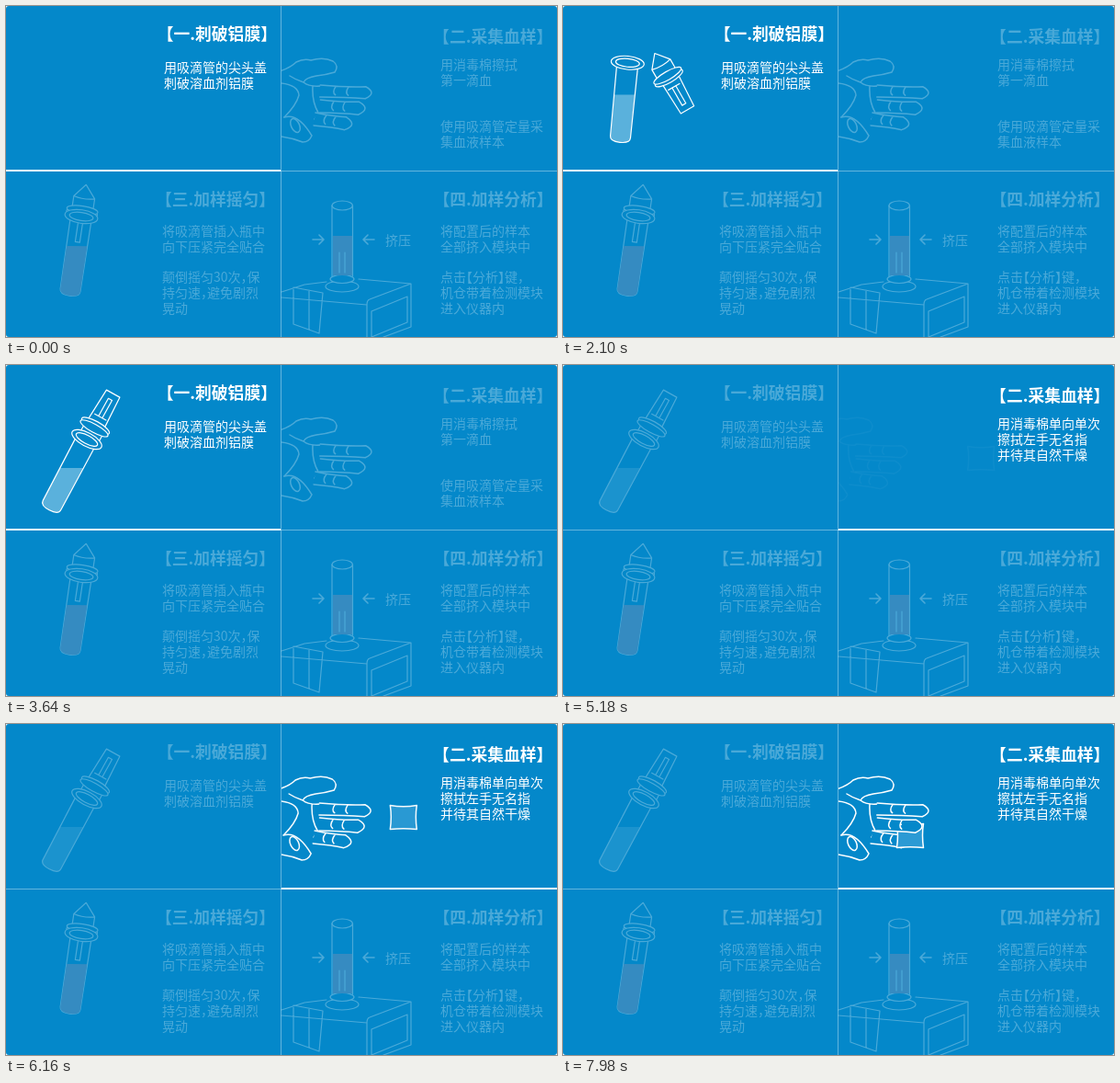
An HTML page that plays this animation: 600 by 360 pixels, repeating every 8000 ms.

```html
<!DOCTYPE html>
<html lang="zh-CN">
<head>
<meta charset="utf-8">
<style>
html, body { margin: 0; height: 100%; overflow: hidden; background: #fff }
svg { display: block; width: 600px; height: 360px }
text { font: 14px "Noto Sans CJK SC", "Noto Sans CJK", sans-serif; font-feature-settings: "halt"; fill: #fff; stroke: none }
.title { font-size: 17.8px; font-weight: 700 }
.art { fill: none; stroke: #fff; stroke-width: 1.2; stroke-linejoin: round; stroke-linecap: round }
.hand { stroke-width: 1.5 }
.solid { fill: #0488ca }
.water { fill: #fff; fill-opacity: .34; stroke: none }
.blood { fill: #b894ac; stroke: none }
.dim { opacity: .28 }
</style>
</head>
<body>
<svg viewBox="0 0 600 360">
  <defs>
    <clipPath id="right"><rect x="300" width="300" height="179"/></clipPath>
    <g id="glass" class="solid">
      <path d="M-11.500 4L-11 81Q-11 87 0 87Q11 87 11 81L11.500 4"/>
      <ellipse rx="18" ry="7.300"/>
      <ellipse rx="13" ry="4.500"/>
    </g>
    <g id="dropper">
      <path d="M-11.500-4V-15L0-29L11.500-15V-4M-11.500-15Q0-12 11.500-15M-9.500 6L-8 42H8.500L10.500 6M-7 13H7M-2.300 13V35H2.300V13"/>
      <ellipse class="solid" cy="2" rx="17" ry="5"/>
      <ellipse class="solid" cy="-1" rx="17" ry="4.500"/>
    </g>
  </defs>
  <rect class="solid" width="600" height="360" rx="3"/>
  <path d="M299.500 0V360M0 179.500H600" stroke="#fff" stroke-opacity=".38"/>
  <path id="bar" d="M0 179H299" stroke="#fff" stroke-width="2"/>

  <g id="p1">
    <g class="art">
      <use id="cap" href="#dropper"/>
      <g id="tube"><use href="#glass"/><path id="water" class="water"/></g>
    </g>
  </g>

  <g id="p2">
    <g id="before"></g><g id="after"></g>
    <g class="art hand" clip-path="url(#right)">
      <g class="slide">
        <path d="M290 73Q308 69 316 61Q324 57 332 59Q346 55 356 60Q363 65 358 72Q348 75 338 76Q326 78 324 83Q330 88 342 87M324 83Q315 80 309 76M300 84Q318 86 319 97Q316 108 303 121M334 87Q333 104 340 116L336 123"/>
        <path class="solid" d="M303 121Q318 116 333 141Q330 148 323 148Q308 142 290 141"/>
        <ellipse cx="315" cy="130" rx="4.500" ry="8" transform="rotate(-25 315 130)"/>
        <g id="low"></g>
      </g>
      <path id="pad" d="M.5.5Q15 3 29.500.5Q27.500 13 29.500 26.500Q15 25 .5 26.500Q2.500 13 .5.5Z" fill="#2b9ad4"/>
      <g class="slide" id="high"></g>
    </g>
  </g>

  <g id="p3" class="dim">
    <g class="art">
      <use href="#dropper" transform="translate(83 223) rotate(8.500)"/>
      <g transform="translate(82 229) rotate(8.500)">
        <use href="#glass"/>
        <path class="blood" d="M-11 34L11 31V81Q11 87 0 87Q-11 87-11 81Z"/>
        <path d="M-2.500 8V28H2.500V8"/>
      </g>
    </g>
  </g>

  <g id="p4" class="dim">
    <g class="art">
      <path d="M300 311L325 303L349 300M384 297L441 302L396 319Q393 320 393 325V360M441 302V349L411 360M300 317L393 325M313 306V346L341 356L345 312L313 306M330 309V352M398 332L437 316V344L398 360Z"/>
      <ellipse class="solid" cx="366" cy="305" rx="18" ry="6"/>
      <ellipse class="solid" cx="366" cy="297" rx="13" ry="4.500"/>
      <path class="blood" d="M356 250H377V293H356Z"/>
      <path d="M355 217V294M377.500 217V294M363 268V290M369 268V290"/>
      <ellipse cx="366.200" cy="217" rx="11.200" ry="5"/>
      <path d="M334 254H346M341 249L346 254L341 259M401 254H389M394 249L389 254L394 259" stroke-width="1.600"/>
    </g>
  </g>
</svg>
<script>
const $ = id => document.getElementById(id);
const set = (el, attrs) => { for (const k in attrs) el.setAttribute(k, attrs[k]); };
const add = (id, html) => $(id).insertAdjacentHTML("beforeend", html);

function write(id, x, y, text, cls = "") {
  text.split("/").forEach((s, i) =>
    add(id, `<text class="${cls}" x="${x}" y="${Math.round(y + i * 16.8)}">${s}</text>`));
}
write("p1", 173.6, 37, "【一.刺破铝膜】", "title");
write("p1", 172, 72, "用吸滴管的尖头盖/刺破溶血剂铝膜");
write("p2", 474, 40, "【二.采集血样】", "title");
write("before", 473, 69, "用消毒棉擦拭/第一滴血///使用吸滴管定量采/集血液样本");
write("after", 473, 69, "用消毒棉单向单次/擦拭左手无名指/并待其自然干燥");
write("p3", 171.8, 217, "【三.加样摇匀】", "title");
write("p3", 170, 250, "将吸滴管插入瓶中/向下压紧完全贴合//颠倒摇匀30次，保/持匀速，避免剧烈/晃动");
write("p4", 474.3, 217, "【四.加样分析】", "title");
write("p4", 473, 250, "将配置后的样本/全部挤入模块中//点击【分析】键，/机仓带着检测模块/进入仪器内");
write("p4", 413, 260, "挤压");

// a finger with two joint creases, open at its base
function finger(id, x, y, length, width, angle) {
  const r = width / 2, end = length - r, mid = length / 2;
  const crease = at => `M${at} ${1 - r}q-4 ${r} 0 ${width * .7}`;
  add(id, `<path class="solid" transform="translate(${x} ${y}) rotate(${angle})"
    d="M0 ${-r}Q${mid} ${1.5 - r} ${end} ${-r}q${width} ${r} 0 ${width}Q${mid} ${r - 1} 0 ${r}${crease(length * .3)}${crease(length * .55)}"/>`);
}
finger("low", 336, 123, 41, 14, 8);
finger("high", 342, 109, 49, 14, 3);
finger("high", 342, 92.5, 56, 13, 2);

const mix = (a, b, p) => a + (b - a) * p;
function ease(t, from, to) {
  const p = Math.min(1, Math.max(0, (t - from) / (to - from)));
  return p * p * (3 - 2 * p);
}

function draw(now) {
  const t = Math.floor(now % 8000 / 140) * 140;
  const second = t >= 5180;
  const enter = ease(t, 0, 980), flip = ease(t, 1820, 2800), plug = ease(t, 3080, 3640);
  const slide = second ? ease(t, 5040, 6300) : 1, wipe = ease(t, 7000, 7980);

  const angle = 28 * flip;
  set($("tube"), {
    transform: `translate(${mix(29, 66, enter) + 22 * flip} ${57 + 24 * flip}) rotate(${angle})`,
    opacity: enter
  });
  // the surface stays level as the tube tilts
  const rise = 11 * Math.tan(angle * Math.PI / 180);
  set($("water"), { d: `M-11 ${35 + rise}L11 ${35 - rise}V81Q11 87 0 87Q-11 87-11 81Z` });

  const capX = mix(134, 115.5, enter) - 6 * flip - 13 * plug;
  const capY = 99.5 - 56.5 * flip - 20 * Math.sin(Math.PI * flip) + 25 * plug;
  set($("cap"), { transform: `translate(${capX} ${capY}) rotate(${-151 * flip})`, opacity: enter });

  for (const el of document.querySelectorAll(".slide"))
    set(el, { transform: `translate(${mix(-24, 0, slide)})`, opacity: slide });
  set($("pad"), {
    transform: `translate(${mix(441, 417, slide) - 54 * wipe} ${88 + 20 * wipe})`,
    opacity: second ? slide : 0
  });

  $("p1").classList.toggle("dim", second);
  $("p2").classList.toggle("dim", !second);
  set($("bar"), { d: second ? "M300 179H600" : "M0 179H299" });
  set($("before"), { opacity: +!second });
  set($("after"), { opacity: +second });
  requestAnimationFrame(draw);
}
draw(performance.now());
</script>
</body>
</html>
```
